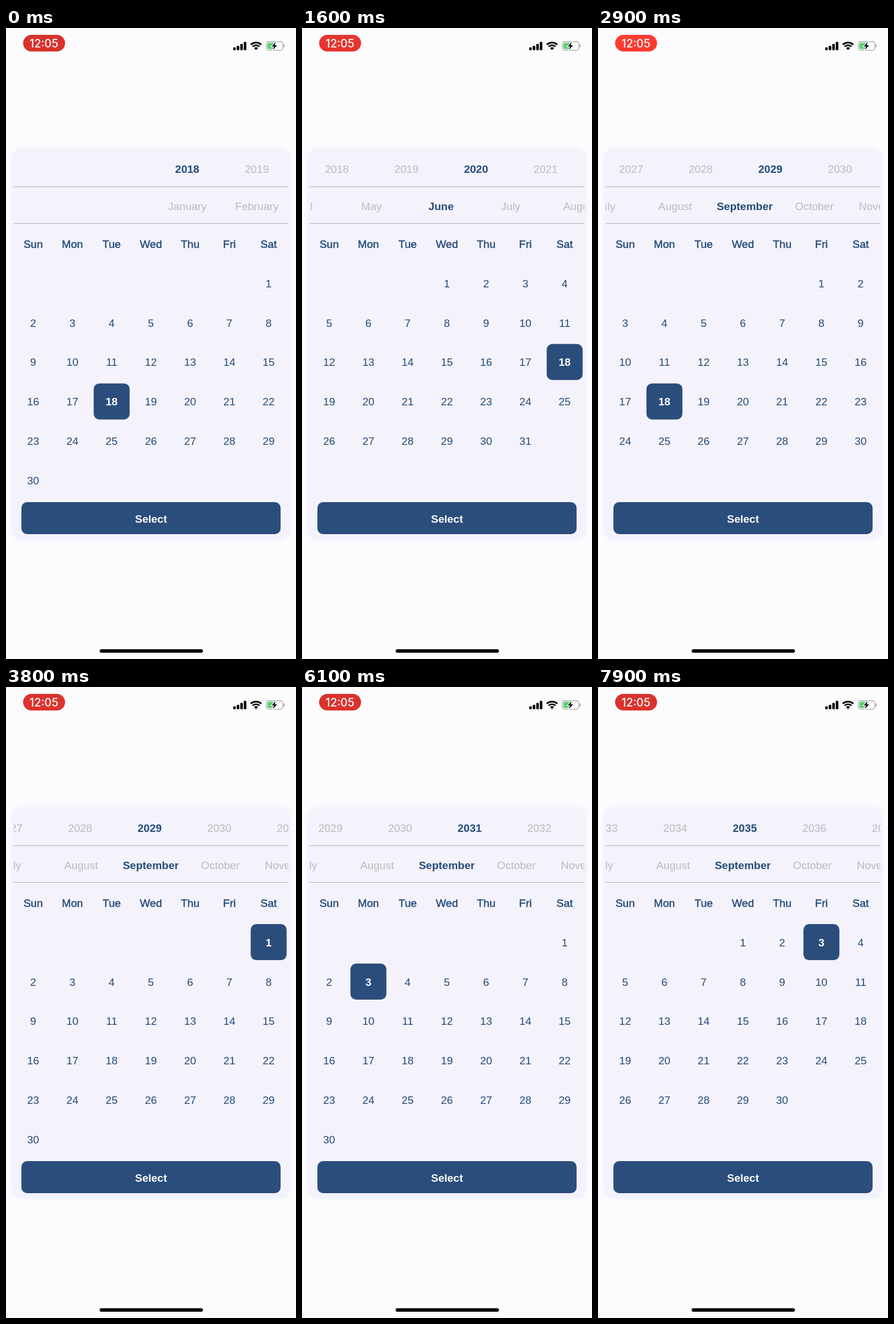
An HTML page with a canvas for the animation above (8 s loop, 508 by 1102 pixels).

```html
<!DOCTYPE html>
<html lang="en">
<head>
<meta charset="utf-8">
<title>Date picker</title>
<style>
  html, body { margin: 0; width: 508px; height: 1102px; overflow: hidden; background: #fcfcfe; }
  canvas { display: block; width: 508px; height: 1102px; }
</style>
</head>
<body>
<canvas id="stage"></canvas>
<script>
const W = 508, H = 1102, LOOP = 8000;
const BLUE = '#244c79', NAVY = '#2b4d7c', GREY = '#b9babf';
const SANS = '"Liberation Sans", Arial, sans-serif';
const MONTHS = ['January', 'February', 'March', 'April', 'May', 'June', 'July',
  'August', 'September', 'October', 'November', 'December'];
const WEEKDAYS = ['Sun', 'Mon', 'Tue', 'Wed', 'Thu', 'Fri', 'Sat'];
const YEARS = Array.from({ length: 30 }, (_, i) => String(2018 + i));
const CENTER = 253.5, ITEM = 121.9;
const SCROLL_START = 700;

// [time, list index at the centre of the card]
const monthScroll = [[SCROLL_START, -0.525], [1100, 2.48], [1500, 4.7], [2100, 6.52], [3000, 8]];
const yearScroll = [[1450, -0.525], [1700, 3.4], [2100, 7.72], [2600, 10.1], [3400, 11.01],
  [3800, 11.015], [4200, 11], [5700, 11], [6200, 13.2], [6600, 15.3], [7000, 16.25],
  [7400, 16.75], [7900, 16.97]];
// [time, year, month index]
const calendars = [[0, 2018, 8], [1300, 2018, 3], [1600, 2018, 7], [1900, 2022, 7],
  [2400, 2026, 7], [2800, 2028, 8], [3200, 2029, 8], [6600, 2032, 8]];
// [time, day]
const picks = [[0, 18], [3500, 1], [4500, 4], [5400, 3]];

const canvas = document.getElementById('stage');
const ctx = canvas.getContext('2d');
const ratio = window.devicePixelRatio || 1;
canvas.width = W * ratio;
canvas.height = H * ratio;
ctx.scale(ratio, ratio);

const latest = (steps, t) => steps.filter(step => step[0] <= t).pop();

// Monotone cubic interpolation, at rest at both ends.
function glide(keys, t) {
  const last = keys.length - 1;
  if (t <= keys[0][0]) return keys[0][1];
  if (t >= keys[last][0]) return keys[last][1];
  const rate = i => (keys[i + 1][1] - keys[i][1]) / (keys[i + 1][0] - keys[i][0]);
  const slope = i => {
    if (i === 0 || i === last) return 0;
    const a = rate(i - 1), b = rate(i);
    return a * b > 0 ? 2 * a * b / (a + b) : 0;
  };
  const i = keys.findIndex(key => key[0] > t) - 1;
  const [t0, v0] = keys[i], [t1, v1] = keys[i + 1];
  const span = t1 - t0, u = (t - t0) / span, w = 1 - u;
  return v0 * (1 + 2 * u) * w * w + v1 * u * u * (3 - 2 * u)
    + span * u * w * (slope(i) * w - slope(i + 1) * u);
}

function box(x, y, w, h, r, color) {
  ctx.fillStyle = color;
  ctx.beginPath();
  ctx.roundRect(x, y, w, h, r);
  ctx.fill();
}

function label(text, x, y, color, weight = 400) {
  ctx.font = `${weight === 700 ? 700 : 400} 19px ${SANS}`;
  ctx.textAlign = 'center';
  ctx.fillStyle = color;
  ctx.fillText(text, x, y);
  if (weight === 500) {
    ctx.strokeStyle = color;
    ctx.lineWidth = 0.5;
    ctx.strokeText(text, x, y);
  }
}

function statusBar(t) {
  const glow = (1 - Math.cos(t * Math.PI / 1000)) / 2;
  const mix = (a, b) => Math.round(a + (b - a) * glow);
  box(30, 12, 73.5, 29, 14.5, `rgb(${mix(217, 255)},${mix(50, 59)},${mix(45, 48)})`);
  ctx.font = '500 19.5px Inter, sans-serif';
  ctx.textAlign = 'center';
  ctx.fillStyle = '#fff';
  ctx.fillText('12:05', 66.5, 33.5);

  [5, 7.5, 11, 14.5].forEach((h, i) => box(398 + 6.2 * i, 38.7 - h, 4.4, h, 1.2, '#000'));

  const from = -Math.PI * 0.75, to = -Math.PI * 0.25;
  ctx.strokeStyle = '#000';
  ctx.lineWidth = 2.8;
  for (const r of [13, 8.4]) {
    ctx.beginPath();
    ctx.arc(438, 38.5, r, from, to);
    ctx.stroke();
  }
  ctx.fillStyle = '#000';
  ctx.beginPath();
  ctx.moveTo(438, 38.7);
  ctx.arc(438, 38.5, 4.9, from, to);
  ctx.fill();

  ctx.strokeStyle = '#a5a5a8';
  ctx.lineWidth = 1.3;
  ctx.beginPath();
  ctx.roundRect(456, 24, 29, 14.8, 4);
  ctx.stroke();
  box(486.3, 29, 1.8, 5, 1, '#a5a5a8');
  box(458, 26, 13.5, 10.8, 2, '#55d16b');
  ctx.beginPath();
  [[472.5, 24.5], [465.5, 32.2], [469.5, 32.2], [467.5, 38.3], [474.7, 30.3], [470.7, 30.3]]
    .forEach(([x, y]) => ctx.lineTo(x, y));
  ctx.closePath();
  ctx.strokeStyle = '#fcfcfe';
  ctx.lineWidth = 2.4;
  ctx.stroke();
  ctx.fillStyle = '#000';
  ctx.fill();
}

function card() {
  ctx.save();
  ctx.shadowColor = 'rgba(190,198,255,0.4)';
  ctx.shadowBlur = 12;
  ctx.shadowOffsetY = 2;
  box(13.5, 212, 481, 676, 12, '#f4f2fb');
  ctx.restore();
  for (const y of [276.5, 340.8]) box(13.5, y, 481, 1.2, 0, '#b1bcc2');
}

function wheel(items, position, chosen, y) {
  ctx.save();
  ctx.beginPath();
  ctx.rect(13.5, 212, 481, 130);
  ctx.clip();
  items.forEach((item, i) => {
    const x = CENTER + (i - position) * ITEM;
    if (x < -60 || x > W + 60) return;
    const active = i === chosen;
    label(item, x, y, active ? BLUE : GREY, active ? 700 : 400);
  });
  ctx.restore();
}

function calendar(year, month, picked) {
  const columnX = i => 47.6 + 68.75 * i;
  WEEKDAYS.forEach((name, i) => label(name, columnX(i), 384, BLUE, 500));
  const first = new Date(year, month, 1).getDay();
  const count = new Date(year, month + 1, 0).getDate();
  for (let day = 1; day <= count; day++) {
    const cell = first + day - 1;
    const x = columnX(cell % 7), y = 445.7 + 68.85 * Math.floor(cell / 7);
    const active = day === picked;
    if (active) box(x - 31.5, y - 31.6, 63, 63, 10, NAVY);
    label(day, x, y + 7, active ? '#fff' : BLUE, active ? 700 : 400);
  }
}

function draw(t) {
  ctx.fillStyle = '#fcfcfe';
  ctx.fillRect(0, 0, W, H);
  statusBar(t);
  card();

  const year = glide(yearScroll, t), month = glide(monthScroll, t);
  wheel(YEARS, year, Math.max(0, Math.round(year)), 253);
  wheel(MONTHS, month, t <= SCROLL_START ? 8 : Math.max(0, Math.round(month)), 317.5);

  const [, shownYear, shownMonth] = latest(calendars, t);
  calendar(shownYear, shownMonth, latest(picks, t)[1]);

  box(27, 828, 454, 56, 10, NAVY);
  label('Select', 254, 863.5, '#fff', 700);
  box(164, 1085, 181, 6, 3, '#000');
}

const start = performance.now();
function tick() {
  draw((performance.now() - start) % LOOP);
  requestAnimationFrame(tick);
}
tick();
</script>
</body>
</html>
```
